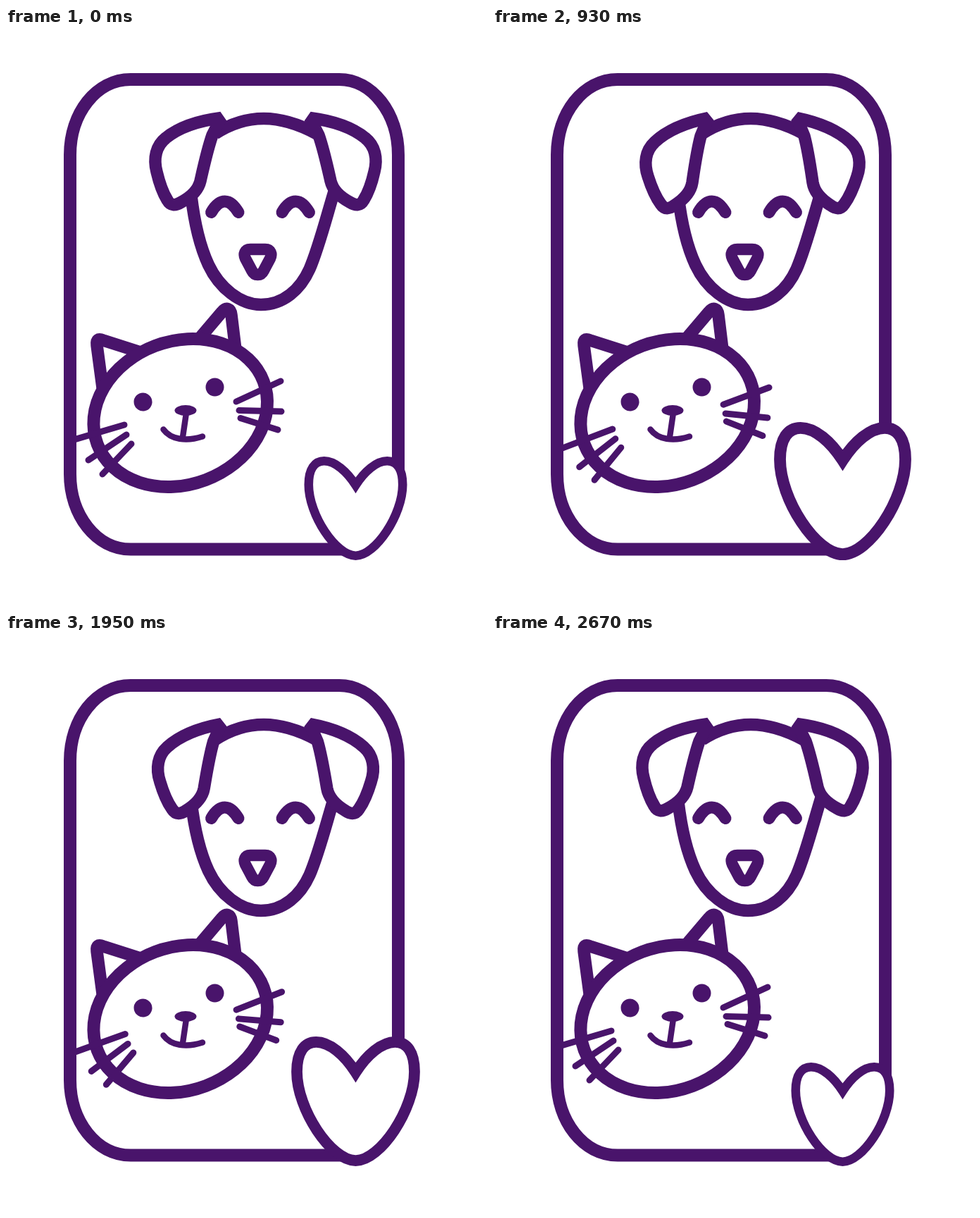
Animation, 683 px wide and 820 px high, one loop 2700 ms. Source, as an HTML page with a canvas:

```html
<!DOCTYPE html>
<html lang="en">
<head>
<meta charset="utf-8">
<title>Dog, cat and heart</title>
<style>
  html, body { margin: 0; width: 100%; height: 100%; overflow: hidden; background: #fff; }
  canvas { display: block; }
</style>
</head>
<body>
<canvas id="stage" width="683" height="820"></canvas>
<script>
const ctx = document.getElementById('stage').getContext('2d');
const INK = '#49146b';
const LOOP = 2700, STEP = 30;
const SWING = 5.5 * Math.PI / 180;

const shapes = {
  frame: new Path2D('M480 739.5H177C128 739.5 91 691 91 633V180C91 121 128 73 177 73H473C520 73 557 121 557 180V650'),
  skull: new Path2D('M297 150C320 135 343 128.5 366 128.5S415 136 441 150'),
  jaw: new Path2D('M263 238C267 272 275 309 287.5 336C303 369 333 392.5 362 392.5C394 392.5 418 371 431 342C444 312 455 268 466 232'),
  dogEar: new Path2D('M305.5 127.5C270 132 243 143 227 156C213 167 209 185 214 204C218 221 224 236 229 244C234 253 241 252 249 247C262 240 273 230 276 217C281 195 286 172 293 152Z'),
  dogEye: new Path2D('M291.5 261.5C297 252 303 246 310.7 246S324 252 330 261.5'),
  dogNose: new Path2D('M347 314H368C376 314 378 321 375 327L366 344C362 352 353 352 349 344L340 327C337 321 339 314 347 314Z'),
  catEars: new Path2D('M137 510L129 450C128 442 131 440 138 443L188 459M275 440L306.5 403C313 395 319 398 320 407L325.5 452'),
  catMouth: new Path2D('M256 546L251 580M223.5 569.5C234 584 256 587 279 579.5'),
  whiskersLeft: new Path2D('M168 563L92 585.4M171 577L117 613M178 590L137 633'),
  whiskersRight: new Path2D('M327 530L390 501M331 542.5L391 544M333 553.5L386 570'),
  heart: new Path2D('M0-9C-40-9-95.3-92-95.3-153C-95.3-185-83-201-64-201C-42-201-18-180 0-152C18-180 42-201 64-201C83-201 95.3-185 95.3-153C95.3-92 40-9 0-9Z')
};

function stroke(path, width, cap = 'butt', join = 'miter') {
  ctx.lineWidth = width;
  ctx.lineCap = cap;
  ctx.lineJoin = join;
  ctx.stroke(path);
}

function fill(path, color) {
  ctx.fillStyle = color;
  ctx.fill(path);
}

function ellipse(x, y, rx, ry, angle = 0) {
  const path = new Path2D();
  path.ellipse(x, y, rx, ry, angle, 0, 2 * Math.PI);
  return path;
}

function placed(draw) {
  ctx.save();
  draw();
  ctx.restore();
}

function rotated(x, y, angle, draw) {
  placed(() => {
    ctx.translate(x, y);
    ctx.rotate(angle);
    ctx.translate(-x, -y);
    draw();
  });
}

function drawDog(swing) {
  stroke(shapes.jaw, 17.5);
  stroke(shapes.skull, 17.5);

  const ear = () => rotated(308, 125, -swing, () => {
    fill(shapes.dogEar, '#fff');
    stroke(shapes.dogEar, 17.5, 'butt', 'bevel');
  });
  ear();
  placed(() => {
    ctx.translate(737, 0);
    ctx.scale(-1, 1);
    ear();
  });

  stroke(shapes.dogEye, 17, 'round');
  placed(() => {
    ctx.translate(100.5, 0);
    stroke(shapes.dogEye, 17, 'round');
  });
  stroke(shapes.dogNose, 16.5);
}

function drawWinkingEye(t) {
  const closed = Math.max(0, 1 - Math.abs(t - 1620) / 120);
  const half = 13 - 10 * closed;
  const radius = Math.max(3, 13 - 2.4 * (13 - half));
  placed(() => {
    ctx.translate(194.5, 530.5);
    ctx.rotate(-0.2);
    const lid = new Path2D();
    lid.roundRect(-13, -half, 26, 2 * half, radius);
    fill(lid, INK);
  });
}

function drawCat(t, swing) {
  stroke(shapes.catEars, 17.5);
  stroke(ellipse(247.7, 546, 126.1, 101.6, -0.361), 18);
  drawWinkingEye(t);
  fill(ellipse(296.5, 509.5, 13, 13), INK);
  fill(ellipse(255, 542.5, 15.5, 7.5), INK);
  stroke(shapes.catMouth, 8.5, 'round');
  rotated(250, 542, -swing, () => stroke(shapes.whiskersLeft, 9, 'round'));
  rotated(271, 533, swing, () => stroke(shapes.whiskersRight, 9, 'round'));
}

function drawHeart(scale) {
  placed(() => {
    ctx.translate(496.5, 755);
    ctx.scale(scale, scale);
    fill(shapes.heart, '#fff');
    stroke(shapes.heart, 18);
  });
}

function render(t) {
  const pulse = (1 - Math.cos(2 * Math.PI * t / LOOP)) / 2;
  const swing = SWING * pulse;
  ctx.fillStyle = '#fff';
  ctx.fillRect(0, 0, 683, 820);
  ctx.strokeStyle = INK;
  stroke(shapes.frame, 18);
  drawDog(swing);
  drawCat(t, swing);
  drawHeart(0.7 + 0.3 * pulse);
}

const start = performance.now();
function tick() {
  const t = (performance.now() - start) % LOOP;
  render(Math.floor(t / STEP) * STEP);
  requestAnimationFrame(tick);
}
tick();
</script>
</body>
</html>
```
